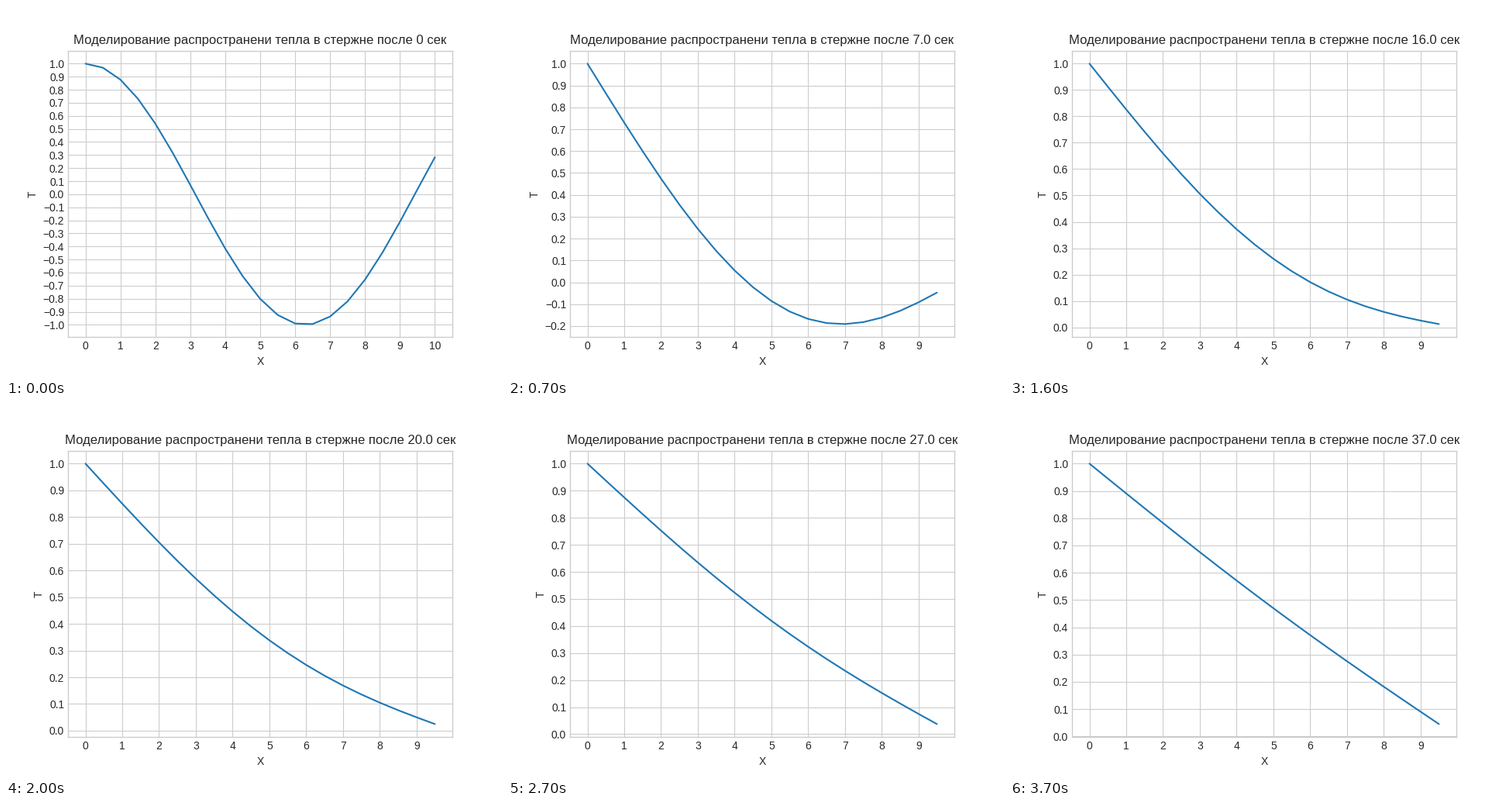
A matplotlib script for the animation above (3.8 s loop, 640x480 px).

```python
import numpy as np
import matplotlib.pyplot as plt
from matplotlib.animation import FuncAnimation
from matplotlib.ticker import MultipleLocator

INK, RULE = "0.15", "0.8"
plt.rcParams.update({
    "font.family": "Liberation Sans",
    "text.color": INK,
    "axes.labelcolor": INK,
    "axes.edgecolor": RULE,
    "axes.linewidth": 1,
    "axes.axisbelow": True,
    "axes.grid": True,
    "grid.color": RULE,
    "grid.linestyle": "-",
    "xtick.color": INK,
    "ytick.color": INK,
    "xtick.major.size": 0,
    "ytick.major.size": 0,
    "lines.solid_capstyle": "round",
})

LENGTH, DX, DT = 10, 0.5, 0.1
SECONDS = 38
STEPS_PER_SECOND = round(1 / DT)
x = np.arange(0, LENGTH + DX / 2, DX)


def simulate():
    """Explicit heat equation; ends held at 1 and 0. One profile per second."""
    temp = np.cos(x / 2)
    profiles = [temp.copy()]
    temp[0], temp[-1] = 1, 0
    for _ in range(SECONDS - 1):
        for _ in range(STEPS_PER_SECOND):
            temp[1:-1] += DT / DX**2 * (temp[2:] - 2 * temp[1:-1] + temp[:-2])
        profiles.append(temp[:-1].copy())
    return profiles


profiles = simulate()

fig, ax = plt.subplots(figsize=(6.4, 4.8), dpi=100)
line, = ax.plot([], [], color="#1f77b4", lw=1.5)
ax.set_xlabel("X")
ax.set_ylabel("T")
ax.xaxis.set_major_locator(MultipleLocator(1))
ax.yaxis.set_major_locator(MultipleLocator(0.1))


def draw(second):
    temp = profiles[second]
    line.set_data(x[:len(temp)], temp)
    ax.relim()
    ax.autoscale_view()
    elapsed = float(second) if second else 0
    ax.set_title("Моделирование распространени тепла в стержне "
                 f"после {elapsed} сек")
    return line,


anim = FuncAnimation(fig, draw, frames=SECONDS, interval=100,
                     init_func=lambda: draw(0), repeat=True, repeat_delay=0)
plt.show()
```
